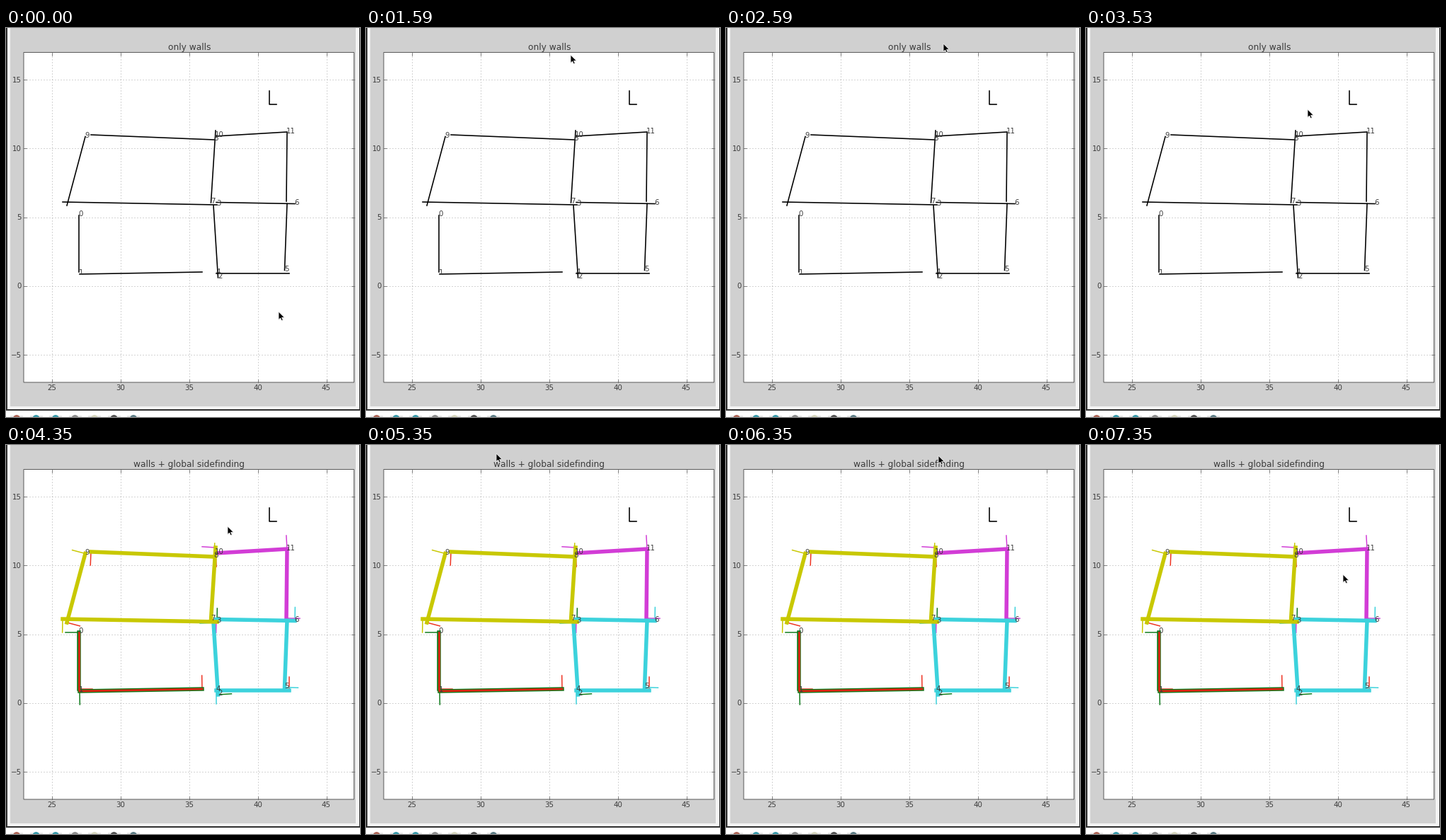
Recreate the animation shown at these times as a matplotlib script. Size 500 by 550 pixels, loop 8000 ms.

```python
import matplotlib.pyplot as plt
import numpy as np
from matplotlib.animation import FuncAnimation
from matplotlib.patches import Circle, Polygon, Rectangle

W, H, DPI = 500, 550, 100
STEP, LOOP, SWITCH = 50, 8000, 4350
PX = 72 / DPI
INK = "#3c3c3c"
COLORS = {"R": "#ee3322", "G": "#0d7a1a", "M": "#d23cd6",
          "C": "#3cd2dc", "Y": "#c8c800"}
PRIORITY = "RGMCY"
TICK = 19

plt.rcParams["font.family"] = "DejaVu Sans"
fig = plt.figure(figsize=(W / DPI, H / DPI), dpi=DPI, facecolor="white")
ax = fig.add_axes([0, 0, 1, 1])
ax.set(xlim=(0, W), ylim=(H, 0))
ax.axis("off")


def line(points, color="black", width=1.6, z=3, **kw):
    x, y = zip(*points)
    return ax.plot(x, y, color=color, lw=width * PX, zorder=z, **kw)[0]


def box(x0, y0, x1, y1, color, z=0):
    ax.add_patch(Rectangle((x0, y0), x1 - x0, y1 - y0, fc=color, lw=0, zorder=z))


def label(x, y, text, size=10.2, ha="left"):
    return ax.text(x, y, text, fontsize=size * PX, color=INK, ha=ha,
                   va="baseline", zorder=6)


def draw_window():
    box(0, 0, W, 540.7, "#303030")
    box(1.5, 0, 498.5, 539.3, "#f4f4f4")
    box(5.5, 0, 494, 535, "#d0d0d0")
    icons = ("#b0685a", "#3a9cac", "#3a9cac", "#909090", "#d8d8c0", "#555555", "#5f7f88")
    for i, color in enumerate(icons):
        x = 15 + 27.5 * i
        box(x - 9, 548, x + 9, H, "#ebebeb")
        ax.add_patch(Circle((x, 552), 5, fc=color, lw=0))


def draw_axes():
    left, top, right, bottom = 25, 34.5, 491.5, 501
    box(left, top, right, bottom, "white", 1)
    for i in range(5):
        x, y = 64.5 + 97 * i, 73 + 97.25 * i
        line([(x, bottom), (x, top)], "#aaaaaa", 1, 1.5, ls=(0, (1, 3)))
        line([(left, y), (right, y)], "#aaaaaa", 1, 1.5, ls=(0, (1, 3)))
        for edge, inward in ((top, 4), (bottom, -4)):
            line([(x, edge), (x, edge + inward)], "#666666", 0.8, 2)
        for edge, inward in ((left, 4), (right, -4)):
            line([(edge, y), (edge + inward, y)], "#666666", 0.8, 2)
        label(x, 512.5, f"{25 + 5 * i}", ha="center")
        label(22, y + 3.7, f"{15 - 5 * i}".replace("-", "\u2212"), ha="right")
    ax.add_patch(Rectangle((left, top), right - left, bottom - top, fill=False,
                           ec="#5a5a5a", lw=PX, zorder=2, snap=False))


# numbered walls: start, end, and the rooms on the right and left of that direction
WALLS = [
    ((102.5, 265), (102.5, 345), "GR"),
    ((104, 348), (277, 345), "GR"),
    ((299.5, 353), (293, 251), "GC"),
    ((298, 250), (80, 246), "GY"),
    ((297, 346.5), (400, 346.5), "CR"),
    ((393.5, 342.5), (397, 248.5), "CR"),
    ((408, 248.5), (297, 246.5), "CM"),
    ((289.5, 247), (296, 145), "YM"),
    ((294, 158), (120, 151), "YR"),
    ((112, 153.5), (86, 251), "YR"),
    ((296, 153), (397, 147), "RM"),
    ((397, 148), (396, 245), "RM"),
]
plain, colored = [], []


def add_wall(number, start, end, rooms):
    """Draw one wall with a side tick at each end: right at the start, left at the end."""
    start, end = np.array(start), np.array(end)
    dx, dy = (end - start) / np.hypot(*(end - start))
    side = TICK * np.array([-dy, dx])
    top_room = max(rooms, key=PRIORITY.index)
    plain.append(line([start, end]))
    colored.append(line([start, end], COLORS[top_room], 5.5,
                        4 + PRIORITY.index(top_room) / 10,
                        solid_capstyle="projecting"))
    if top_room == "G":
        colored.append(line([start, end], "#dd2211", 2.8, 4.9))
    colored.append(line([start, start + side], COLORS[rooms[0]], 1.5, 3.5))
    colored.append(line([end, end - side], COLORS[rooms[1]], 1.5, 3.5))
    label(start[0] - 0.6, start[1] + 1.3, str(number))


draw_window()
draw_axes()
line([(371.5, 89), (371.5, 108.3), (382, 108.3)])
for number, wall in enumerate(WALLS):
    add_wall(number, *wall)

title = label(259, 31, "", 12.2, "center")
ARROW = np.array([(0, 0), (0, 11.5), (2.6, 9.2), (4.3, 12.8),
                  (6.2, 12), (4.6, 8.4), (8.2, 8.2)])
cursor = ax.add_patch(Polygon(ARROW, fc="black", ec="#eeeeee", lw=0.8 * PX, zorder=9))

# pointer moves: start time, end time, destination
MOVES = [
    (470, 760, (357, 315)),
    (1340, 1590, (289, 38)), (1590, 2200, (207, 14)),
    (2200, 2590, (307, 22)), (2590, 2960, (254, 16)), (2960, 3520, (313, 115)),
    (4930, 5390, (184, 12)), (5390, 5720, (320, 16)), (5720, 6050, (178, 8)),
    (6050, 6390, (300, 15)), (6390, 6820, (171, 20)), (6820, 7340, (363, 183)),
]


def tip_at(t):
    tip = np.array([385.0, 401.0])
    for begin, finish, goal in MOVES:
        u = np.clip((t - begin) / (finish - begin), 0, 1)
        tip = tip + (np.array(goal) - tip) * u * u * (3 - 2 * u)
    return tip


def update(n):
    t = n * STEP + 40
    sided = t >= SWITCH + 40
    title.set_text("walls + global sidefinding" if sided else "only walls")
    for artist in colored:
        artist.set_visible(sided)
    for artist in plain:
        artist.set_visible(not sided)
    cursor.set_xy(ARROW + tip_at(t))
    return [title, cursor, *plain, *colored]


anim = FuncAnimation(fig, update, frames=LOOP // STEP, interval=STEP,
                     repeat=True, repeat_delay=0, blit=False)
plt.show()
```
